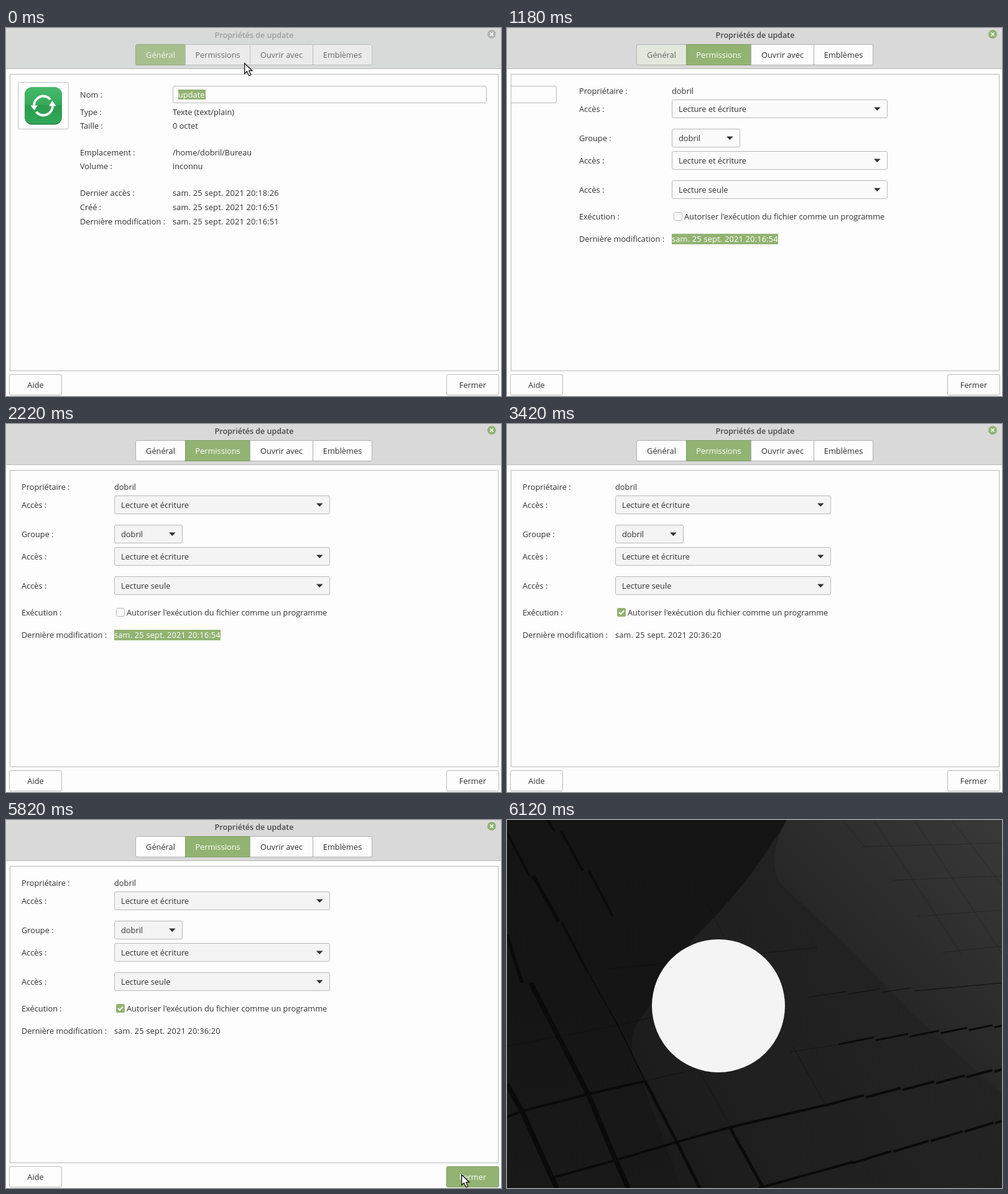
Recreate the animation shown at these times as an HTML page. Size 796 by 592 pixels, loop 6720 ms.

```html
<!DOCTYPE html>
<html lang="fr">
<head>
<meta charset="utf-8">
<title>Propriétés</title>
<style>
html, body { margin: 0; width: 100%; height: 100%; overflow: hidden; background: #fdfdfd; }
svg { display: block; width: 796px; height: 592px; }
text { font: 12.8px "Open Sans", "Noto Sans", sans-serif; fill: #303030; white-space: pre; }
.mid { text-anchor: middle; }
.title { font-weight: 600; font-size: 12.5px; }
.date { letter-spacing: .2px; }
.box { fill: #fdfdfd; stroke: #b9b9b9; }
.seam { fill: none; stroke: #0a0a0a; }
</style>
</head>
<body>
<svg id="stage" viewBox="0 0 796 592"></svg>
<script>
const LOOP = 6720;
const GREEN = '#92b372';
const USER = 'dobril';
const stage = document.getElementById('stage');

const label = (x, y, s, attrs = '') => `<text x="${x}" y="${y + 5}" ${attrs}>${s}</text>`;
const box = (x, y, w, h, attrs = 'class="box"') =>
  `<rect x="${x + .5}" y="${y + .5}" width="${w - 1}" height="${h - 1}" rx="2.5" ${attrs}/>`;
const combo = (y, w, s) => box(174, y, w, 30, 'class="box combo"') + label(185, y + 15, s) +
  `<path d="M${w + 152} ${y + 12.5}h10.6l-5.3 5.5z" fill="#303030"/>`;
const button = (id, x, s) => `<g id="${id}">${box(x, 557, 85, 34)}${label(x + 42.5, 574, s, 'class="mid"')}</g>`;
const seam = (width, d, attrs = '') => `<path class="seam" stroke-width="${width}" d="${d}" ${attrs}/>`;

const tabs = [['Général', 208, 81], ['Permissions', 288, 105], ['Ouvrir avec', 392, 102], ['Emblèmes', 493, 96]];

const tabBar = tabs.map(([s, x, w], i) =>
  `<g id="tab${i}"><rect x="${x + .5}" y="26.5" width="${w - 1}" height="33" rx="${i % 3 ? 0 : 2.5}"/>
   ${label(x + w / 2, 43, s, 'class="mid"')}</g>`).join('');

const icon = `${box(19, 87, 82, 76, 'fill="#fdfdfd" stroke="#c4c4c4"')}
  <rect x="30" y="95.5" width="60" height="60" rx="12" fill="#1d7a3c"/>
  <rect x="30" y="95" width="60" height="59" rx="12" fill="url(#leaf)"/>
  <g fill="none" stroke="#fff" stroke-width="4">
    <path d="M71.5 115A15 15 0 0 0 45 125"/><path d="M48.5 135A15 15 0 0 0 75 125"/>
  </g>
  <path d="M39.5 124.5h11.5l-5.5 8zM69 125.5h11.5l-6-8.5z" fill="#fff"/>`;

const generalRows = [
  [107, 'Nom :', ''], [135, 'Type :', 'Texte (text/plain)'], [157, 'Taille :', '0 octet'],
  [200, 'Emplacement :', `/home/${USER}/Bureau`], [222, 'Volume :', 'inconnu'],
  [265, 'Dernier accès :', 'sam. 25 sept. 2021 20:18:26'],
  [288, 'Créé :', 'sam. 25 sept. 2021 20:16:51'],
  [311, 'Dernière modification :', 'sam. 25 sept. 2021 20:16:51']
];

const general = icon + box(268, 93, 505, 28) +
  `<rect x="277" y="99" width="44" height="16" fill="${GREEN}"/>` + label(277, 107, 'update', 'style="fill:#fff"') +
  generalRows.map(([y, name, value]) =>
    label(119, y, name) + label(268, y, value, y > 260 ? 'class="date"' : '')).join('');

const permissionRows = [
  [101, 'Propriétaire :'], [130, 'Accès :'], [177, 'Groupe :'], [213, 'Accès :'],
  [260, 'Accès :'], [303, 'Exécution :'], [339, 'Dernière modification :']
];

const permissions = permissionRows.map(([y, s]) => label(25, y, s)).join('') +
  label(174, 101, USER) + combo(115, 347, 'Lecture et écriture') + combo(162, 110, USER) +
  combo(198, 347, 'Lecture et écriture') + combo(245, 347, 'Lecture seule') +
  box(177, 296, 14, 14) +
  `<g id="check"><rect x="177" y="296" width="14" height="14" rx="2.5" fill="${GREEN}"/>
   <path d="M180.2 303l2.8 2.8 5-5.3" fill="none" stroke="#fff" stroke-width="2"/></g>` +
  label(194, 303, "Autoriser l'exécution du fichier comme un programme") +
  `<rect id="mark" x="174" y="331" width="171" height="17" fill="${GREEN}"/>` +
  label(174, 339, '', 'id="stamp" class="date"');

// A row of staggered strokes that shrink into the distance
function steps(x, y, pitch, drop, rise, width) {
  let d = '';
  while (x < 796) {
    d += `M${x} ${y}l${pitch - 3} ${-rise * pitch}`;
    x += pitch;
    y -= drop * pitch;
    pitch *= .91;
  }
  return seam(width, d);
}

const desktop = `<rect width="796" height="592" fill="url(#night)"/>
  <path d="M450 0Q385 110 300 190L225 305Q190 345 205 385L280 592H0V0z" fill="url(#shade)"/>
  <path d="M450 0Q412 70 445 108L545 200L650 310L796 440V0z" fill="url(#sheen)"/>
  ${seam(1, `M570 43L796 37M620 97L796 90M660 155L796 145M700 213L796 203M540 0L575 43
    M590 0L730 215M655 0L796 215M715 0L796 105`, 'opacity=".28"')}
  ${seam(1, `M0 364L178 330L235 317M160 240L500 205M222 420L340 392M455 373L535 361
    M310 405L360 494M460 365L512 458M320 130L350 190`, 'opacity=".5"')}
  ${seam(1.5, 'M485 285L545 276M548 280L600 272M604 277L650 270M655 275L796 262', 'opacity=".6"')}
  ${seam(4, 'M0 20L36 90M65 0L76 18M87 18L122 82M132 82L170 155M88 165L129 243', 'opacity=".9"')}
  ${seam(6, 'M42 90L83 163M0 185L24 262')}
  ${seam(2, 'M129 243L178 330L222 420')}
  ${seam(8, 'M38 262L130 440L175 548L195 592M0 425L25 470L72 575L80 592')}
  ${seam(5, 'M222 420L273 518L310 592M359 496L411 590')}
  ${seam(4, 'M0 478L25 468L130 441L222 420M70 576L172 548L273 518L360 494L515 458M405 592L557 550')}
  ${steps(533, 361, 60, .11, .19, 3)}
  ${steps(512, 459, 65, .2, .25, 4)}
  ${steps(555, 552, 66, .28, .29, 4)}
  <circle cx="340" cy="299" r="107" fill="#f4f4f4"/>`;

stage.innerHTML = `<defs>
    <linearGradient id="leaf" x1="0" y1="0" x2="0" y2="1">
      <stop stop-color="#46b96a"/><stop offset=".48" stop-color="#35ab5b"/>
      <stop offset=".5" stop-color="#2a9d4f"/><stop offset="1" stop-color="#33a758"/>
    </linearGradient>
    <linearGradient id="night" x1="0" y1=".8" x2="1" y2=".4">
      <stop stop-color="#171717"/><stop offset=".45" stop-color="#1f1f1f"/><stop offset="1" stop-color="#252525"/>
    </linearGradient>
    <linearGradient id="shade" x1="0" y1="0" x2="0" y2="1">
      <stop stop-color="#141414"/><stop offset=".5" stop-color="#151515"/><stop offset="1" stop-color="#191919"/>
    </linearGradient>
    <linearGradient id="sheen" gradientUnits="userSpaceOnUse" x1="560" y1="215" x2="770" y2="0">
      <stop stop-color="#272727"/><stop offset="1" stop-color="#383838"/>
    </linearGradient>
    <clipPath id="page"><rect x="7" y="75" width="784" height="476"/></clipPath>
  </defs>
  <g id="dialog">
    <rect width="796" height="592" fill="#fdfdfd"/>
    <rect id="header" width="796" height="66"/>
    <path d="M0 65.5H796" stroke="#bababa"/>
    ${label(399, 11, 'Propriétés de update', 'id="title" class="mid title"')}
    <circle id="close" cx="781" cy="10" r="7"/>
    <path d="M778.5 7.5l5 5m0-5l-5 5" stroke="#fff" stroke-width="1.6"/>
    ${tabBar}
    <rect x="6.5" y="74.5" width="785" height="477" fill="none" stroke="#bababa"/>
    <g clip-path="url(#page)"><g id="general">${general}</g><g id="permissions">${permissions}</g></g>
    ${button('help', 5, 'Aide')}${button('done', 708, 'Fermer')}
  </g>
  <g id="desktop">${desktop}</g>
  <path id="cursor" d="M.7 .8V17.3L4.5 13.8L7.6 20.4Q9.3 21.3 10.7 19.2L7.8 12.7H13z"
    fill="#fff" stroke="#111" stroke-width="1.3"/>`;

const el = {};
stage.querySelectorAll('[id]').forEach(n => el[n.id] = n);
const combos = stage.querySelectorAll('.combo');

const show = (node, on) => node.style.display = on ? '' : 'none';
const move = (node, x, y = 0) => node.setAttribute('transform', `translate(${x} ${y})`);

function paint(group, fill, ink, edge) {
  const [rect, text] = [group.querySelector('rect'), group.querySelector('text')];
  rect.style.fill = fill;
  rect.style.stroke = edge;
  text.style.fill = ink;
}

// [start, x, y]; without a place the pointer is hidden
const pointer = [[0, 383, 56], [150, 382, 54], [300, 386, 19], [450, 380, 32], [590, 362, 44],
  [1040], [5820, 732, 570], [6120]];

function draw(t) {
  const focused = t >= 1180, settled = t >= 1330, dated = t >= 3420;

  show(el.dialog, t < 5970);
  show(el.desktop, t >= 5970);

  el.header.style.fill = focused ? '#d9d9d9' : '#d8dad9';
  el.title.style.fill = focused ? '#484848' : '#9c9e9d';
  el.close.style.fill = focused ? GREEN : '#b3b5b4';

  const plain = focused ? ['#fdfdfd', '#303030', '#b0b0b0'] : ['#ebebeb', '#6a6a6a', '#bcbcbc'];
  const active = [GREEN, '#fff', '#7f9d62'];
  paint(el.tab0, ...(settled ? plain : focused ? ['#e3e8dd', '#666', '#b0b0b0'] : ['#a7bf8f', '#f0f3ec', '#94aa7e']));
  paint(el.tab1, ...(t >= 1040 ? active : plain));
  paint(el.tab2, ...plain);
  paint(el.tab3, ...plain);

  move(el.general, !focused ? 0 : settled ? -785 : -693);
  move(el.permissions, !focused ? 785 : settled ? 0 : 91);
  combos.forEach(c => c.style.fill = settled ? '#f4f4f4' : '#fbfbfb');

  show(el.check, t >= 3270);
  show(el.mark, !dated);
  el.stamp.textContent = 'sam. 25 sept. 2021 ' + (dated ? '20:36:20' : '20:16:54');
  el.stamp.style.fill = dated ? '#303030' : '#fff';
  paint(el.done, ...(t >= 5820 ? active : ['#fdfdfd', '#303030', '#b9b9b9']));

  const [, x, y] = pointer.filter(p => p[0] <= t).pop();
  show(el.cursor, x !== undefined);
  if (x !== undefined) move(el.cursor, x, y);
}

const began = performance.now();
function tick() {
  draw((performance.now() - began) % LOOP);
  requestAnimationFrame(tick);
}
tick();
</script>
</body>
</html>
```
